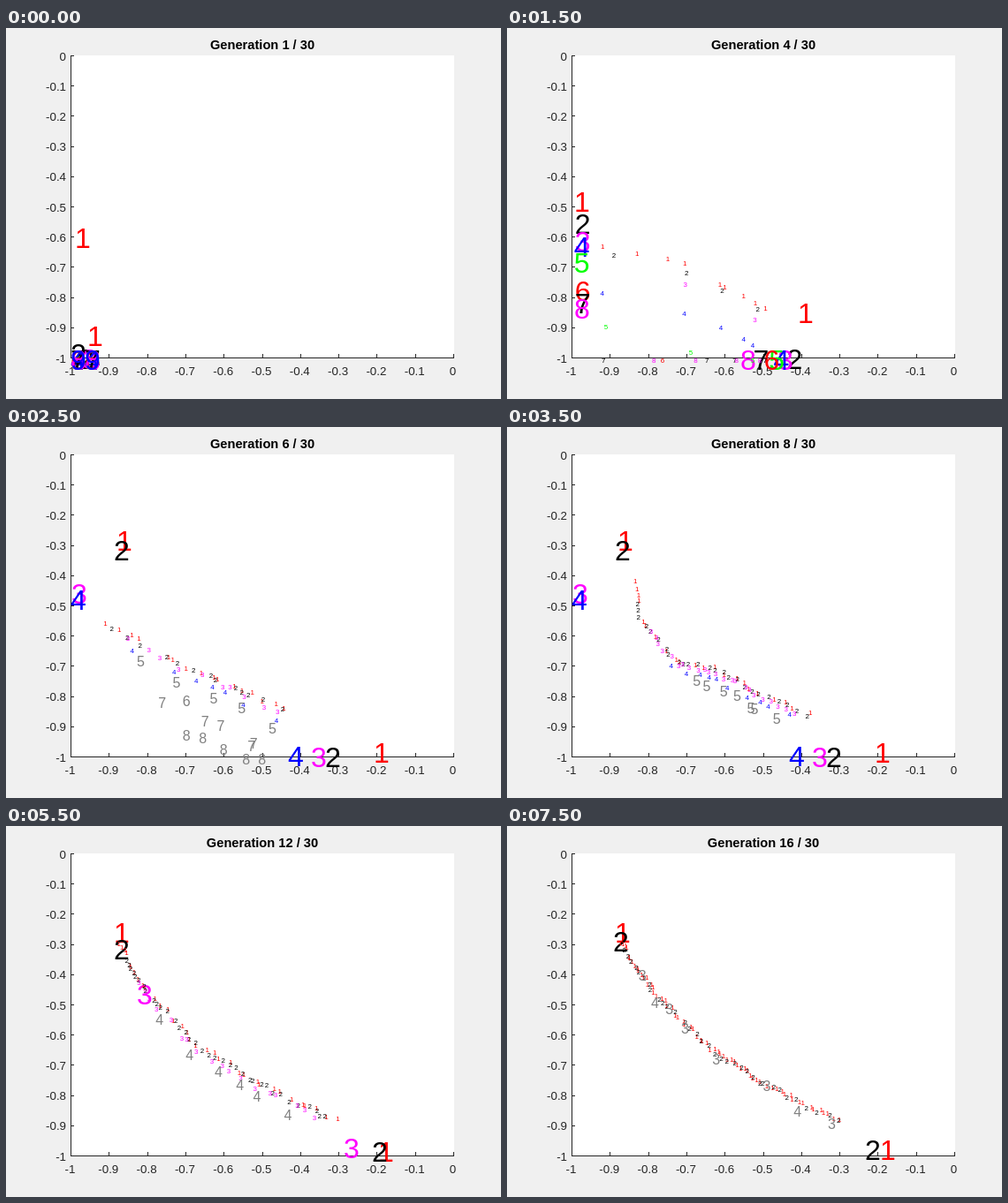
An HTML page with a canvas that plays this animation: 560x420 px, repeating every 8 s.

```html
<!DOCTYPE html>
<html>
<head>
<meta charset="utf-8">
<style>
html, body { margin: 0; width: 100%; height: 100%; overflow: hidden; background: #f0f0f0; }
canvas { display: block; }
</style>
</head>
<body>
<canvas id="plot" width="560" height="420"></canvas>
<script>
const ctx = document.getElementById('plot').getContext('2d');
const LEFT = 73, TOP = 31, WIDTH = 434, HEIGHT = 342, FLOOR = 376;
const STEP = 500, COUNT = 16;
const PALETTE = ['#f00', '#000', '#f0f', '#00f', '#0f0'];
const INK = '#262626', GREY = '#808080';

// Stages of the evolution:
//   front  key points of the best front     counts  members per rank
//   depth  how far worse ranks fall behind  inset   how much shorter they get
//   grey   first rank drawn large and grey  crowd   labels piled in the corner
//   ranks  number of extreme labels, strung along the left and floor paths
const stages = [];
const stage = (gen, settings) =>
  stages.push({ gen, depth: 1.3, inset: 0, grey: 99, crowd: 0, ...settings });

stage(1, {
  front: [82, 372, 98, 372], counts: [], crowd: 6,
  ranks: 3, left: [87, 238, 82, 369, 82, 376], floor: [101, 349, 91, 375, 95, 375]
});
stage(3, {
  front: [81, 240, 198, 265, 271, 303, 286, 315], counts: [4, 0, 0, 4, 2], depth: 10, crowd: 4,
  ranks: 8, left: [87, 238, 86, 243, 82, 325, 82, 363, 82, 375],
  floor: [312, 376, 280, 308, 278, 312, 253, 376, 240, 376, 147, 376, 109, 376, 98, 376]
});
stage(5, {
  front: [81, 240, 199, 270, 257, 294, 300, 318], counts: [13, 7, 4, 6, 4, 1, 8, 7], depth: 1.7,
  ranks: 8, left: [85, 197, 86, 240, 84, 250, 86, 306, 85, 318],
  floor: [338, 323, 316, 414, 308, 376, 298, 376, 273, 376]
});
stage(8, {
  front: [145, 166, 150, 212, 190, 262, 240, 275, 288, 302, 350, 329],
  counts: [22, 25, 23, 10, 7], inset: 0.12, grey: 5,
  ranks: 4, left: [134, 129, 131, 140, 83, 189, 82, 196], floor: [425, 369, 370, 374, 354, 374, 328, 373]
});
stage(10, {
  front: [145, 166, 150, 212, 186, 250, 240, 267, 290, 294, 361, 326],
  counts: [28, 30, 16, 12, 3, 1], inset: 0.1, grey: 5,
  ranks: 4, left: [134, 129, 131, 140, 97, 162, 82, 189], floor: [425, 369, 377, 371, 370, 374, 344, 332]
});
stage(12, {
  front: [126, 128, 152, 175, 213, 245, 290, 292, 378, 335],
  counts: [34, 36, 18, 6], depth: 2, inset: 0.1, grey: 4,
  ranks: 3, left: [131, 121, 131, 140, 157, 191], floor: [430, 369, 423, 369, 391, 365]
});
stage(16, {
  front: [127, 128, 165, 185, 228, 250, 290, 290, 378, 335],
  counts: [64, 34, 6, 2], inset: 0.03, grey: 3,
  ranks: 2, left: [131, 121, 129, 131], floor: [431, 367, 414, 367]
});

const lerp = (a, b, f) => a + (b - a) * f;
const rand = n => { const s = Math.sin(n * 127.1 + 11.7) * 43758.5453; return s - Math.floor(s); };
const rankColor = rank => PALETTE[(rank - 1) % 5];

// Point at share t (0 to 1) of a path of x, y pairs.
function along(path, t) {
  const last = path.length / 2 - 1;
  const k = Math.min(Math.floor(t * last), last - 1), f = t * last - k;
  return [lerp(path[2 * k], path[2 * k + 2], f), lerp(path[2 * k + 1], path[2 * k + 3], f)];
}

function label(text, x, y, font, color, align = 'center') {
  ctx.font = font + ' "Liberation Sans", Arial, sans-serif';
  ctx.fillStyle = color;
  ctx.textAlign = align;
  ctx.fillText(text, x, y);
}

function mark(rank, x, y, size, color = rankColor(rank)) {
  label(rank, x, Math.min(y, FLOOR) + size * 0.358, size + 'px', color);
}

function drawLeaders({ ranks, left, floor, crowd }) {
  for (let i = 0; i < ranks; i++)
    for (const path of [left, floor])
      mark(i + 1, ...along(path, i / (ranks - 1)), 32);
  for (let i = 0; i < crowd; i++)
    for (const x of [82, 98]) mark(i + 4, x, FLOOR, 32);
}

function drawSwarm(gen, prev, next) {
  const f = next === prev ? 1 : (gen - prev.gen) / (next.gen - prev.gen);
  const inset = lerp(prev.inset, next.inset, f), depth = lerp(prev.depth, next.depth, f);
  const ranks = Math.max(prev.counts.length, next.counts.length);
  for (let r = 0; r < ranks; r++) {
    const count = Math.round(lerp(prev.counts[r] || 0, next.counts[r] || 0, f));
    const grey = r + 1 >= next.grey;
    for (let i = 0; i < count; i++) {
      const seed = r * 71 + i;
      const t = lerp(r * inset, 1 - r * inset / 4, (i + rand(seed)) / count);
      const [x0, y0] = along(prev.front, t), [x1, y1] = along(next.front, t);
      const scatter = (rand(seed + 500) - 0.5) * 5;
      mark(r + 1, lerp(x0, x1, f) - scatter / 2, lerp(y0, y1, f) + r * r * depth + scatter,
        grey ? 16 : 8, grey ? GREY : rankColor(r + 1));
    }
  }
}

function drawAxes(gen) {
  ctx.fillStyle = '#f0f0f0';
  ctx.fillRect(0, 0, 560, 420);
  ctx.fillStyle = '#fff';
  ctx.fillRect(LEFT, TOP, WIDTH, HEIGHT);
  ctx.fillStyle = INK;
  ctx.fillRect(LEFT, TOP, 1, HEIGHT + 1);
  ctx.fillRect(LEFT, TOP + HEIGHT, WIDTH, 1);
  const name = n => n === 0 ? '0' : n === 10 ? '-1' : '-0.' + n;
  for (let i = 0; i <= 10; i++) {
    const x = LEFT + (WIDTH - 1) * i / 10, y = TOP + HEIGHT * i / 10;
    ctx.fillStyle = INK;
    ctx.fillRect(Math.round(x), TOP + HEIGHT - 4, 1, 4);
    ctx.fillRect(LEFT, Math.round(y), 4, 1);
    label(name(10 - i), x - 0.5, 393, '13.33px', INK);
    label(name(i), 68, y + 5.5, '13.33px', INK, 'right');
  }
  label(`Generation ${gen} / 30`, 290, 24, 'bold 14.67px', '#000');
}

function draw(now) {
  const gen = Math.floor(now / STEP) % COUNT + 1;
  const next = stages.find(s => s.gen >= gen);
  const prev = next.gen === gen ? next : stages[stages.indexOf(next) - 1];
  drawAxes(gen);
  ctx.save();
  ctx.beginPath();
  ctx.rect(LEFT, 0, 560 - LEFT, 420);
  ctx.clip();
  drawLeaders(next);
  drawSwarm(gen, prev, next);
  ctx.restore();
}

const start = performance.now();
function tick() {
  draw(performance.now() - start);
  requestAnimationFrame(tick);
}
tick();
</script>
</body>
</html>
```
